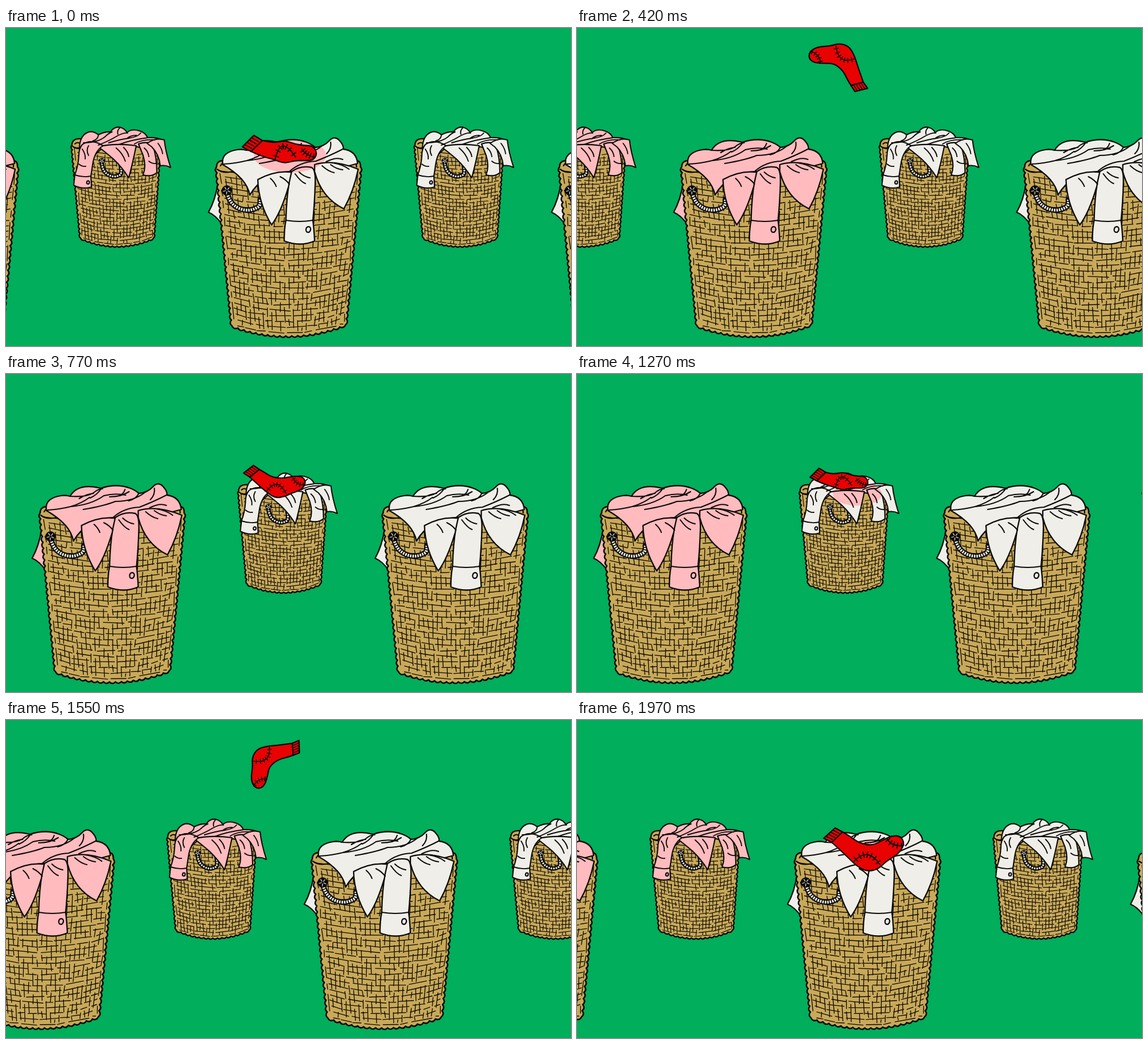
An HTML page with a canvas for the animation above (2470 ms loop, 985 px wide and 554 px high).

```html
<!DOCTYPE html>
<html lang="en">
<head>
<meta charset="utf-8">
<title>Laundry</title>
<style>
html, body { margin: 0; width: 100%; height: 100%; overflow: hidden; background: #00ae5b; }
canvas { display: block; width: 100%; height: 100%; }
</style>
</head>
<body>
<canvas id="stage" width="985" height="554"></canvas>
<script>
const ctx = document.getElementById('stage').getContext('2d');
const GREEN = '#00ae5b', TAN = '#c9a959', INK = '#0b0a08';
const WHITE = '#efeee8', PINK = '#ffbbbe', RED = '#e80202';
const STEP = 70, HALF = 1270, LOOP = 2470, GAP = 598;

const lerp = (a, b, u) => a + (b - a) * u;
const mix = (p, q, u) => [lerp(p[0], q[0], u), lerp(p[1], q[1], u)];
const path = d => new Path2D(d);

function random(seed) {
  return () => (seed = (seed * 16807) % 2147483647) / 2147483647;
}

// ---- Baskets ----

// Adds a row of outward bumps along a quadratic curve.
function braid(out, a, c, b, pitch) {
  const n = Math.round(Math.hypot(b[0] - a[0], b[1] - a[1]) / pitch);
  let p = a;
  for (let i = 1; i <= n; i++) {
    const u = i / n, q = mix(mix(a, c, u), mix(c, b, u), u);
    const dx = q[0] - p[0], dy = q[1] - p[1];
    out.quadraticCurveTo((p[0] + q[0]) / 2 - dy * .5, (p[1] + q[1]) / 2 + dx * .5, q[0], q[1]);
    p = q;
  }
}

function bodyPath({ tl, bl, br, tr, sag, pitch }) {
  const p = new Path2D();
  p.moveTo(tl[0] + 15, tl[1] - 11);
  p.quadraticCurveTo(tl[0], tl[1] - 12, ...tl);
  braid(p, tl, mix(tl, bl, .5), bl, pitch);
  braid(p, bl, [(bl[0] + br[0]) / 2, bl[1] + sag * 2], br, pitch);
  braid(p, br, mix(br, tr, .5), tr, pitch);
  p.quadraticCurveTo(tr[0] + 1, tr[1] - 13, tr[0] - 12, tr[1] - 11);
  p.closePath();
  return p;
}

function weavePath({ tl, bl, br, tr, sag, cell }) {
  const rnd = random(4711), p = new Path2D();
  const at = (u, v) => {
    const [x, y] = mix(mix(tl, bl, v), mix(tr, br, v), u);
    return [x, y + sag * 4 * u * (1 - u) * lerp(.6, .95, v)];
  };
  const w = tr[0] - tl[0], h = bl[1] - tl[1];
  const run = (count, dash, gap, dot) => {
    for (let i = 0; i < count; i++) {
      const line = (i + .6) / count;
      let s = .025 + rnd() * gap;
      while (s < .96) {
        const e = Math.min(.975, s + dash * (.35 + rnd()));
        const wob = (rnd() - .5) * .22 / count;
        p.moveTo(...dot(line + wob, s));
        p.lineTo(...dot(line - wob, e));
        s = e + gap * (.25 + rnd());
      }
    }
  };
  run(Math.round(h / cell), cell * 3.6 / w, cell * .9 / w, (v, u) => at(u, v));
  run(Math.round(w / cell), cell * 2.5 / h, cell * 1.7 / h, (u, v) => at(u, v));
  return p;
}

function makeBasket(o) {
  o.body = bodyPath(o);
  o.weave = weavePath(o);
  o.rope = path(o.rope);
  o.rim = path(o.rim);
  o.back = o.back && path(o.back);
  o.cloths = o.cloths.map(path);
  o.folds = path(o.folds);
  return o;
}

const big = makeBasket({
  tl: [59, 242], bl: [86, 519], br: [284, 517], tr: [310, 242],
  sag: 18, pitch: 10.5, cell: 9.4, line: 2.3, hatch: 1.35,
  button: [219, 351, 4, 5], knot: [77, 283, 9], ropeWidth: 9.5,
  rope: 'M77 283Q80 306 98 314Q116 322 133 311Q136 306 135 299',
  rim: 'M60 246Q70 254 88 250M66 240Q70 232 78 236M296 232Q303 230 303 242',
  back: 'M62 268Q57 300 45 321Q58 326 70 344L76 290Z',
  cloths: [
    'M70 238Q66 219 90 213Q102 210 111 213Q125 189 165 199Q192 190 216 199Q226 203 231 208' +
    'Q246 207 256 196Q266 186 275 198Q281 205 280 211Q303 214 305 236L290 240L232 252L190 250' +
    'Q140 252 117 291Q112 262 70 238Z',
    'M188 251Q160 248 131 264Q132 305 155 343Q171 322 184 278L200 252Z',
    'M190 250Q206 239 225 243Q232 247 231 272Q230 305 227 335Q229 350 230 371' +
    'Q205 382 177 371Q177 350 180 335Q181 295 186 268Z',
    'M230 238Q262 228 306 246Q298 285 281 315Q242 296 230 250Z'
  ],
  folds: 'M180 335Q204 339 227 335M72 237Q92 236 112 231Q148 228 170 212Q190 207 208 211' +
    'M111 213Q140 215 152 207Q160 200 168 200M127 217Q140 209 152 208M112 231Q132 225 145 215' +
    'M134 236Q170 230 190 222Q222 222 242 206M180 214Q200 214 214 205M166 199Q158 211 146 216' +
    'M186 250Q205 233 232 232Q258 222 279 211M231 208Q226 218 213 221M258 199Q260 210 251 219' +
    'M250 233Q268 224 279 229M207 201Q204 210 196 212M262 235Q280 238 290 246' +
    'M153 262Q160 268 163 276M170 259Q180 264 186 272M203 251Q211 259 222 261M196 254Q206 268 214 271' +
    'M243 240Q254 250 264 252M258 238Q268 246 279 247',
  stain: [187, 222, 1]
});

const small = makeBasket({
  tl: [466, 204], bl: [481, 366], br: [608, 366], tr: [619, 212],
  sag: 14, pitch: 8, cell: 6.6, line: 2.1, hatch: 1.2,
  button: [494, 269, 2.3, 2.8], knot: [518, 232, 5.5], ropeWidth: 7.5,
  rope: 'M518 232Q518 250 530 256Q541 262 551 255Q553 249 551 240',
  rim: 'M467 206Q472 211 481 208M471 202Q474 198 480 201',
  cloths: [
    'M479 208Q480 188 493 182Q502 178 512 186Q524 180 533 181Q540 171 550 173Q558 175 562 182' +
    'Q570 175 583 179Q594 182 598 191Q612 190 624 195L612 215L580 207L520 208L505 222Z',
    'M582 202Q600 196 607 205Q614 225 614 252Q605 260 590 256Q596 240 590 222Z',
    'M597 201Q612 190 627 195Q629 215 638 243Q629 238 620 240Q618 220 605 207Z',
    'M512 207Q540 200 578 205Q572 235 565 261Q553 242 538 228Q524 216 512 207Z',
    'M484 203Q500 192 520 205Q505 215 502 238L499 258L500 277Q484 282 469 274L471 256' +
    'Q477 240 478 222Q478 210 484 203Z'
  ],
  folds: 'M471 256Q486 261 499 258M486 200Q510 200 523 190Q530 183 536 181M512 186Q512 194 502 197' +
    'M512 204Q530 197 545 188Q556 182 563 183M530 200Q550 194 565 192Q580 190 586 183' +
    'M548 203Q568 195 599 191M550 173Q544 179 546 185M575 202Q590 193 610 195M561 193Q568 187 578 187' +
    'M484 211Q490 220 489 228M495 205Q490 213 495 222M478 237Q484 242 490 241M543 209Q555 219 559 232' +
    'M556 208Q564 216 565 224M592 209Q599 215 600 224M600 232Q606 237 613 236M616 201Q623 210 624 219',
  stain: [566, 209, .68]
});

function stroke(p, width, color = INK) {
  ctx.lineWidth = width;
  ctx.strokeStyle = color;
  ctx.stroke(p);
}

// dye: 0 is clean, Infinity is fully dyed, else the stain's height radius.
function paintCloth(p, dye, o) {
  ctx.fillStyle = dye === Infinity ? PINK : WHITE;
  ctx.fill(p);
  if (dye > 0 && dye < Infinity) {
    const [x, y, s] = o.stain;
    ctx.save();
    ctx.clip(p);
    ctx.beginPath();
    ctx.ellipse(x, y, dye * s * 2.1, dye * s, 0, 0, 7);
    ctx.fillStyle = PINK;
    ctx.fill();
    ctx.restore();
  }
  stroke(p, o.line);
}

function paintRope(o) {
  const [x, y, r] = o.knot, w = o.ropeWidth;
  stroke(o.rope, w);
  ctx.save();
  ctx.lineCap = 'butt';
  ctx.setLineDash([2.6, 1.7]);
  stroke(o.rope, w - 4.5, WHITE);
  ctx.restore();
  ctx.beginPath();
  ctx.arc(x, y, r, 0, 7);
  ctx.fillStyle = INK;
  ctx.fill();
  const marks = new Path2D();
  for (let a = .4; a < 6; a += 1.25) {
    const c = Math.cos(a), s = Math.sin(a);
    marks.moveTo(x + c * r * .25, y + s * r * .25);
    marks.lineTo(x + c * r * .7, y + s * r * .7);
  }
  stroke(marks, 1.2, WHITE);
}

function paintBasket(o, x, dye) {
  if (x < -230 || x > 1200) return;
  const [bx, by, rx, ry] = o.button;
  ctx.save();
  ctx.translate(x - bx, 0);
  if (o.back) paintCloth(o.back, dye, o);
  ctx.fillStyle = TAN;
  ctx.fill(o.body);
  stroke(o.weave, o.hatch);
  stroke(o.body, o.line + .3);
  stroke(o.rim, o.line);
  paintRope(o);
  for (const c of o.cloths) paintCloth(c, dye, o);
  stroke(o.folds, o.line - .2);
  ctx.beginPath();
  ctx.ellipse(bx, by, rx, ry, .2, 0, 7);
  ctx.lineWidth = o.line;
  ctx.stroke();
  ctx.restore();
}

// ---- Sock ----

const FULL = {
  leg: [[-40, -31], [-28, -24], [-12, -12], [12, -7], [30, -17], [48, -25], [62, -23], [68, -10],
    [58, 7], [36, 20], [22, 34], [2, 38], [-16, 28], [-36, 8], [-59, -13]],
  cuff: [[-73, -20], [-53, -38], [-40, -31], [-59, -13]],
  heel: [[-20, 20], [4, -6], [25, 26]],
  toe: [[37, -20], [46, -4], [67, -8]]
};
const SUNK = {
  leg: [[-30, -15], [-18, -12], [-6, -12], [10, -15], [26, -9], [44, -6], [58, -6], [66, 8],
    [58, 20], [40, 20], [26, 20], [8, 25], [-10, 18], [-30, 13], [-50, 4]],
  cuff: [[-65, -4], [-45, -24], [-30, -15], [-50, 4]],
  heel: [[-8, 18], [2, -26], [28, 14]],
  toe: [[39, 0], [46, 12], [62, 14]]
};

function seam([a, c, b], n) {
  const p = new Path2D();
  p.moveTo(...a);
  p.quadraticCurveTo(...c, ...b);
  for (let i = 0; i < n; i++) {
    const u = (i + .5) / n, m = mix(a, c, u), k = mix(c, b, u), q = mix(m, k, u);
    const l = Math.hypot(k[0] - m[0], k[1] - m[1]) / 4.5;
    const nx = (m[1] - k[1]) / l, ny = (k[0] - m[0]) / l;
    p.moveTo(q[0] - nx, q[1] - ny);
    p.lineTo(q[0] + nx, q[1] + ny);
  }
  return p;
}

function paintSock([x, y, turn, size, sink]) {
  const part = name => FULL[name].map((p, i) => mix(p, SUNK[name][i], sink));
  const leg = part('leg'), cuff = part('cuff'), n = leg.length;
  const body = new Path2D(), top = new Path2D(), ribs = new Path2D();

  body.moveTo(...leg[0]);
  for (let i = 1; i < n - 1; i++) {
    body.quadraticCurveTo(...leg[i], ...(i < n - 2 ? mix(leg[i], leg[i + 1], .5) : leg[n - 1]));
  }
  body.closePath();
  cuff.forEach(p => top.lineTo(...p));
  top.closePath();
  for (let u = .2; u < .9; u += .2) {
    const a = mix(cuff[0], cuff[1], u), b = mix(cuff[3], cuff[2], u);
    ribs.moveTo(...a);
    ribs.lineTo(...mix(a, b, .8));
  }

  ctx.save();
  ctx.translate(x, y);
  ctx.rotate(turn * Math.PI / 180);
  ctx.scale(size, size);
  ctx.fillStyle = RED;
  for (const p of [body, top]) {
    ctx.fill(p);
    stroke(p, 2.3 / size);
  }
  stroke(ribs, 1.8);
  stroke(seam(part('heel'), 7), 1.9);
  stroke(seam(part('toe'), 5), 1.9);
  ctx.restore();
}

// Keys: step, x, y, turn, size, sink.
const toSmall = [
  [1, 477, 211, 0, 1, 1], [3, 466, 158, 42, .95, .2], [5, 455, 87, 111, .915, 0],
  [7, 460, 61, 208, .85, 0], [9, 474, 103, 308, .78, 0], [12, 469, 189, 365, .8, .35]
];
const toBig = [
  [1, 457, 183, 0, .78, 1], [3, 460, 132, 50, .78, .2], [5, 461, 70, 130, .8, 0],
  [6, 463, 50, 182, .84, 0], [8, 479, 110, 295, .9, 0], [11, 503, 226, 360, 1, 0]
];

// Smooth curve through the keys.
function pose(keys, k) {
  let i = 0;
  while (i < keys.length - 2 && k >= keys[i + 1][0]) i++;
  const a = keys[i], b = keys[i + 1], p = keys[i - 1] || a, q = keys[i + 2] || b;
  const span = b[0] - a[0], u = (k - a[0]) / span, v = 1 - u;
  return [1, 2, 3, 4, 5].map(j => {
    const ma = (b[j] - p[j]) / (b[0] - p[0]) * span;
    const mb = (q[j] - a[j]) / (q[0] - a[0]) * span;
    const r = a[j] * (1 + 2 * u) * v * v + ma * u * v * v + b[j] * u * u * (3 - 2 * u) - mb * u * u * v;
    return j === 5 ? Math.min(1, Math.max(0, r)) : r;
  });
}

// ---- Timeline ----

const spread = k => k > 6 ? Infinity : 30 + 29 * (k - 1);

function draw(time) {
  const t = time % LOOP, first = t < HALF;
  const k = 1 + Math.min(Math.floor((first ? t : t - HALF) / STEP), first ? 11 : 10);
  const late = Math.max(0, k - 10) ** 2;
  const x = first
    ? 541 - (14 + 30.75 * (k - 1) - 7.7 * late)
    : 219 - (16 + 26.75 * (k - 1) - 7.5 * late);

  ctx.fillStyle = GREEN;
  ctx.fillRect(0, 0, 985, 554);
  ctx.lineJoin = ctx.lineCap = 'round';

  const bigDye = [Infinity, first ? spread(k) : Infinity, !first && k === 11 ? 12 : 0, 0];
  const smallDye = [Infinity, first ? 0 : k > 4 ? Infinity : spread(k), 0, 0];
  for (let i = 0; i < 4; i++) {
    const at = x + (i - 1) * GAP;
    paintBasket(small, at + 214, smallDye[i]);
    paintBasket(big, at, bigDye[i]);
  }
  paintSock(pose(first ? toSmall : toBig, k));
}

const start = performance.now();
function tick() {
  draw(performance.now() - start);
  requestAnimationFrame(tick);
}
tick();
</script>
</body>
</html>
```
